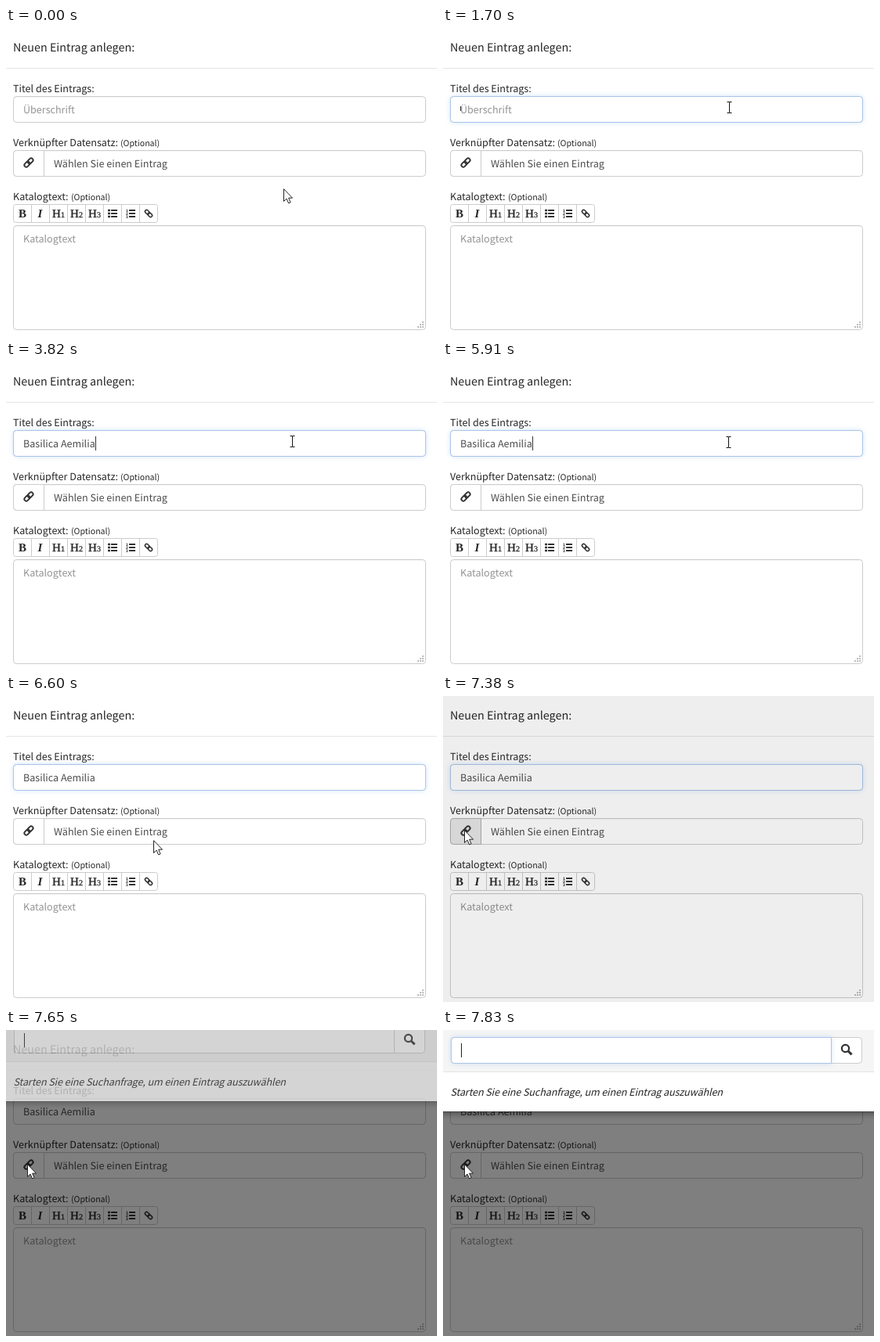
Animation of 550 by 391 pixels, one loop 8 s. Source, as an HTML page:

```html
<!DOCTYPE html>
<html lang="de">
<head>
<meta charset="utf-8">
<title>Neuen Eintrag anlegen</title>
<style>
html, body { margin: 0; width: 100%; height: 100%; overflow: hidden; background: #fff; }
svg { display: block; }
text {
  font: 12.58px "Noto Sans CJK JP", "Noto Sans CJK SC", "Noto Sans CJK", sans-serif;
  fill: #262626; white-space: pre; text-rendering: geometricPrecision;
}
.title { font-size: 14.33px; }
.small { font-size: 10.6px; }
.value { fill: #4c4c4c; }
.hint { fill: #939393; }
.box { fill: #fff; stroke: #ccc; }
.inset { stroke: rgba(0,0,0,.04); }
.glow { fill: #fff; stroke: #a8c4e8; filter: drop-shadow(0 0 3px rgba(102,160,233,.28)); }
.bar text { font: bold 15px "Liberation Serif", serif; }
.bar .h { font-weight: normal; stroke: #333; stroke-width: .35; }
.bar .n { font-size: 10px; }
.bar .tiny { font: bold 5px "Liberation Sans", sans-serif; }
.icon { fill: none; stroke: #333; }
.modal { filter: drop-shadow(0 3px 4.5px rgba(0,0,0,.4)); }
.italic { font-style: italic; letter-spacing: -.105px; }
</style>
</head>
<body>
<svg width="550" height="391" viewBox="0 0 550 391">
  <defs>
    <g id="link" class="icon" stroke-width="2">
      <rect x="-7.2" y="-2.6" width="8" height="5.2" rx="2.6"/>
      <rect x="-.8" y="-2.6" width="8" height="5.2" rx="2.6"/>
    </g>
  </defs>

  <text class="title" x="9" y="30">Neuen Eintrag anlegen:</text>
  <path d="M0 51.5h550" stroke="#e5e5e5"/>

  <text x="9" y="82">Titel des Eintrags:</text>
  <rect class="box" x="9.5" y="87.5" width="526" height="33" rx="4"/>
  <path class="inset" d="M12 88.5h521"/>
  <rect id="focus" class="glow" x="9.5" y="87.5" width="526" height="33" rx="4"/>
  <text id="hint" class="hint" x="22" y="109">Überschrift</text>
  <text id="typed" class="value" x="22" y="109"></text>
  <rect id="caret" width="1" fill="#333"/>

  <text x="9" y="151">Verknüpfter Datensatz: <tspan class="small" x="146">(Optional)</tspan></text>
  <rect class="box" x="9.5" y="156.5" width="526" height="33" rx="4"/>
  <path class="inset" d="M49 157.5h484"/>
  <path id="pick" d="M48.5 156.5v33h-35a4 4 0 0 1-4-4v-25a4 4 0 0 1 4-4z"/>
  <use href="#link" transform="translate(29 172) rotate(-45) scale(.95)"/>
  <text class="value" x="61" y="178">Wählen Sie einen Eintrag</text>

  <text x="9" y="220">Katalogtext: <tspan class="small" x="83">(Optional)</tspan></text>
  <g class="bar">
    <rect class="box" x="9.5" y="225.5" width="184" height="23" rx="3"/>
    <path stroke="#ccc" d="M32.5 226v23m23-23v23m23-23v23m23-23v23m23-23v23m23-23v23m23-23v23"/>
    <text x="16" y="242">B</text>
    <text x="40.5" y="242" style="font-style:italic">I</text>
    <text class="h" x="59" y="242">H<tspan class="n" x="70">1</tspan></text>
    <text class="h" x="82" y="242">H<tspan class="n" x="93">2</tspan></text>
    <text class="h" x="105" y="242">H<tspan class="n" x="116">3</tspan></text>
    <path class="icon" stroke-width="2" d="M134 233h8m-8 4h8m-8 4h8M157 233h8m-8 4h8m-8 4h8"/>
    <path class="icon" stroke-width="2.4" d="M130 233h3m-3 4h3m-3 4h3"/>
    <text class="tiny" x="153" y="235">1</text>
    <text class="tiny" x="153" y="239">2</text>
    <text class="tiny" x="153" y="243">3</text>
    <use href="#link" transform="translate(182 237) rotate(45) scale(.78)"/>
  </g>

  <rect class="box" x="9.5" y="252.5" width="526" height="133" rx="4"/>
  <path class="inset" d="M12 253.5h521"/>
  <text class="hint" x="22" y="274">Katalogtext</text>
  <path stroke="#bbb" stroke-width="2" d="M531 376h2M528 379h2m1 0h2M525 382h2m1 0h2m1 0h2"/>

  <rect id="shade" width="550" height="391"/>

  <g id="modal"><g class="modal">
    <rect x="-20" y="-20" width="590" height="124" fill="#fff"/>
    <rect x="-20" y="-20" width="590" height="73" fill="#f5f5f5"/>
    <path d="M-20 53.5h590" stroke="#e5e5e5"/>
    <path d="M-20 104.5h590" stroke="rgba(0,0,0,.2)"/>
    <path class="box" d="M495.5 9.5h35a4 4 0 0 1 4 4v25a4 4 0 0 1-4 4h-35z"/>
    <path class="box" d="M495.5 9.5v33h-481a4 4 0 0 1-4-4v-25a4 4 0 0 1 4-4z"/>
    <path id="searchFocus" class="glow" d="M495.5 9.5v33h-481a4 4 0 0 1-4-4v-25a4 4 0 0 1 4-4z"/>
    <path d="M23.5 17v18" stroke="#222"/>
    <g class="icon" stroke-width="2.2">
      <circle cx="513.5" cy="23.5" r="4.6"/>
      <path d="M517 27l4.6 4.4" stroke-width="3"/>
    </g>
    <text class="italic" x="9.5" y="84">Starten Sie eine Suchanfrage, um einen Eintrag auszuwählen</text>
  </g></g>

  <path id="arrow" fill="#fff" stroke="#222" stroke-linejoin="round"
    d="M.5.7v15.8l3.6-3.4 2.5 5.8 2.5-1.1-2.5-5.6h4.9z"/>
  <path id="beam" fill="none" stroke="#111" d="M-3 -6.5h2.5l.5 .5l.5 -.5h2.5M0 -6.5v14M-3 7.5h2.5l.5 -.5l.5 .5h2.5"/>
</svg>
<script>
const LOOP = 8000, NAME = 'Basilica Aemilia';
const keys = [1730, 1850, 1970, 2090, 2260, 2370, 2480, 2590, 2690, 2850, 3050, 3150, 3350, 3520, 3690, 3820];
// time, x, y of the mouse pointer
const path = [
  [120, 354, 205], [300, 355, 155], [390, 358, 121], [480, 365, 101],
  [5880, 365, 101], [6120, 335, 122], [6360, 270, 156], [6600, 188, 184],
  [6690, 158, 190], [6820, 103, 191], [6980, 48, 180], [7150, 27, 171]
];
const el = id => document.getElementById(id);
const [focus, hint, typed, caret, pick, shade, modal, searchFocus, arrow, beam] =
  ['focus', 'hint', 'typed', 'caret', 'pick', 'shade', 'modal', 'searchFocus', 'arrow', 'beam'].map(el);

const ramp = (t, from, to) => Math.min(1, Math.max(0, (t - from) / (to - from)));
const show = (node, on) => node.setAttribute('visibility', on ? 'visible' : 'hidden');
const move = (node, x, y) => node.setAttribute('transform', `translate(${x} ${y})`);

function slope(i, k) {
  const a = path[i - 1], b = path[i], c = path[i + 1];
  if (!a || !c || (b[k] - a[k]) * (c[k] - b[k]) <= 0) return 0;
  return (c[k] - a[k]) / (c[0] - a[0]);
}

// smooth curve through the pointer path
function pointer(t, k) {
  const last = path.length - 1;
  if (t <= path[0][0]) return path[0][k];
  if (t >= path[last][0]) return path[last][k];
  const i = path.findIndex(p => p[0] > t) - 1;
  const a = path[i], b = path[i + 1], d = b[0] - a[0], u = (t - a[0]) / d, v = 1 - u;
  return v * v * (1 + 2 * u) * a[k] + u * u * (3 - 2 * u) * b[k]
    + d * u * v * (v * slope(i, k) - u * slope(i + 1, k));
}

// CSS ease-out: cubic-bezier(0, 0, .58, 1)
function easeOut(x) {
  let lo = 0, hi = 1;
  for (let i = 0; i < 20; i++) {
    const s = (lo + hi) / 2;
    if (1.74 * s * s * (1 - s) + s ** 3 < x) lo = s; else hi = s;
  }
  return lo * lo * (3 - 2 * lo);
}

function draw(t) {
  const n = keys.filter(k => k <= t).length;
  typed.textContent = NAME.slice(0, n);
  show(hint, !n);
  focus.setAttribute('opacity', ramp(t, 640, 750) * (1 - ramp(t, 7380, 7520)));

  const width = n ? typed.getComputedTextLength() : 0;
  caret.setAttribute('x', 22 + Math.round(width));
  caret.setAttribute('y', n ? 95 : 100);
  caret.setAttribute('height', n ? 18 : 6);
  show(caret, t >= 680 && t < 7380 && !(t >= 1200 && t < 1700) && !(t >= 6380 && t < 6900));

  const x = Math.round(pointer(t, 1)), y = Math.round(pointer(t, 2));
  const inTitle = y < 121, over = x < 48 && t < 7540;
  show(arrow, !inTitle);
  show(beam, inTitle);
  move(arrow, x, y);
  move(beam, x + .5, y);
  pick.setAttribute('fill', over ? '#e6e6e6' : '#fff');
  pick.setAttribute('stroke', over ? '#adadad' : '#ccc');

  shade.setAttribute('opacity', .5 * ramp(t, 7360, 7520));
  modal.setAttribute('opacity', ramp(t, 7551, 7701));
  move(modal, 0, -Math.round(28 * (1 - easeOut(ramp(t, 7545, 7835)))));
  searchFocus.setAttribute('opacity', ramp(t, 7650, 7800));
}

function tick() {
  draw(performance.now() % LOOP);
  requestAnimationFrame(tick);
}
tick();
</script>
</body>
</html>
```
